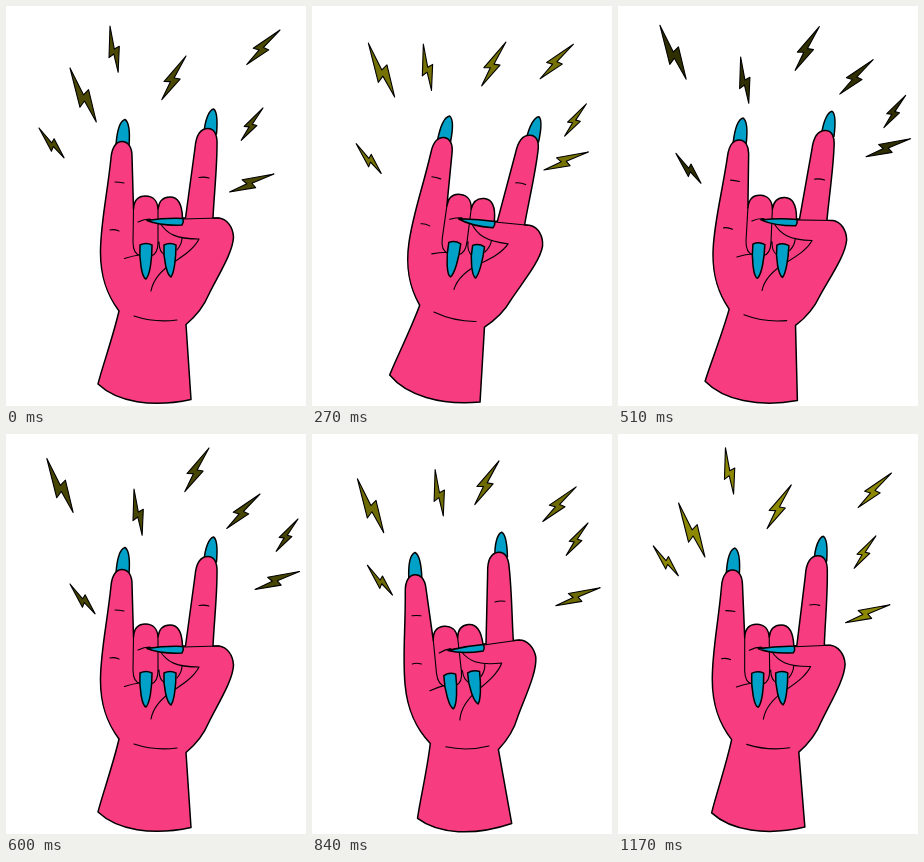
Recreate the animation shown at these times as an HTML page. Size 300 px wide and 400 px high, loop 1.2 s.

```html
<!DOCTYPE html>
<html lang="en">
<head>
<meta charset="utf-8">
<title>Rock hand</title>
<style>
  html, body { margin: 0; width: 100%; height: 100%; overflow: hidden; background: #fff; }
  svg { display: block; width: 100vw; height: 100vh; }
  .line { fill: none; stroke-width: 1.1; }
  .skin { fill: #f73c80; }
  .nail { fill: #00a1c9; }
</style>
</head>
<body>
<svg viewBox="0 0 300 400">
  <g id="bolts" stroke="#000" stroke-width="1.1" stroke-linejoin="round"></g>
  <g id="hand" stroke="#000" stroke-width="1.5" stroke-linejoin="round" stroke-linecap="round">
    <path class="nail" d="M110 139C111 125 114 115 119 113.500C123 116 124 127 123 140Z"/>
    <path class="nail" d="M198 127C199 114 203 104 207.500 103C211 105 211.500 116 210.500 128Z"/>
    <path class="skin" d="M113 305C101 289 94 271 94.500 244C95 215 101 190 105 152
      C106 140 111 135.500 116 135.500C122 135.500 126 141 126 150L127.500 203
      C128 194 133 190 139.500 190C147 190 151.500 195 152 203
      C153 195 157 191 164 191C171 191 176 196 176.500 212L179.500 212
      L189 142C190 130 194 122.500 202 122.500C208 122.500 211.500 128 211 139
      C211 163 208 190 207 212L213 212C221 213 227 221 227.500 231
      C227 246 213 268 203 288C198 300 189 311 180 318.500
      L185 393.500C146 402 111 396 92 378C95 365 107 331 113 305Z"/>
    <path class="line" d="M127.500 203L127 236C127 245 130 249 135 250
      M152 203V236C152 244 149 249 145 250M153 236C153 243 155 247 159 249
      M118.500 252.500Q126 250 133 249M132 216Q138 213 144 213
      M141 214L213 212M154 217C161 228 170 233 193 233
      C188 243 177 250 168 256C154 265 147 274 145 285
      M176 232Q176 238 171 244
      M109 176Q113 176 118 177M104 224Q108 223 113 225M193 171.500Q198 170.500 203 172
      M128 310Q149 317 171 314"/>
    <path class="nail" d="M141 214.500C151 213 163 212 177 212.500Q178 216 176 219C164 219.500 152 219 141 214.500Z"/>
    <path class="nail" d="M134 239Q140 236 146 239C146 253 144 269 140 273C136 272 133 254 134 239Z"/>
    <path class="nail" d="M158 239Q164 236 170 239C170 253 168 267 165 271C161 269 157 253 158 239Z"/>
  </g>
</svg>
<script>
const LOOP = 1200, STEP = 30;
const hand = document.getElementById("hand");
const layer = document.getElementById("bolts");

// A bolt with its tail at the origin, pointing along +x
function zigzag(len) {
  const w = 0.12 * len;
  return `M0 0L${len * 0.5} ${-w * 0.05}L${len * 0.46} ${-w}L${len} 0` +
    `L${len * 0.6} ${w * 0.2}L${len * 0.66} ${w * 1.15}Z`;
}

// Each bolt drifts from its start to a far point and back to an end point
function bolt(start, far, end, angle, len, { bow = 0.2, turn = 0.5 } = {}) {
  const el = document.createElementNS("http://www.w3.org/2000/svg", "path");
  el.setAttribute("d", zigzag(len));
  layer.append(el);
  return { el, start, far, end, angle, bow, turn };
}

const bolts = [
  bolt([104, 20], [128, 55], [105.5, 12], 80, 47),
  bolt([64, 62], [40.5, 18], [62.5, 71], 64, 60, { turn: 0.44 }),
  bolt([180, 50], [203, 14], [172.5, 53.5], 119, 50),
  bolt([274, 24], [254, 60], [274, 37.5], 134, 48),
  bolt([257, 102], [292, 85], [256.5, 103.5], 124, 39),
  bolt([268, 168], [294, 132], [270, 172], 158, 48, { bow: -0.27, turn: 0.44 }),
  bolt([33, 122], [64, 150], [33, 110.5], 50, 39)
];

// Point on a curve from a to b, bowed sideways by a share of its length
function arc([ax, ay], [bx, by], bow, s) {
  const side = 2 * s * (1 - s) * bow;
  return [
    ax + (bx - ax) * s - (by - ay) * side,
    ay + (by - ay) * s + (bx - ax) * side
  ];
}

function place({ start, far, end, bow, turn }, p) {
  return p < turn
    ? arc(start, far, bow, p / turn)
    : arc(far, end, bow, (p - turn) / (1 - turn));
}

// steady swing: 0, 1 at a quarter, -1 at three quarters
const swing = p => 1 - 4 * Math.abs((p + 0.25) % 1 - 0.5);

// flicker that grows stronger through the loop
const glow = p => 88 + (15 + 60 * p) * Math.cos(2 * Math.PI * (2.5 * p - 0.5625));

function draw(ms) {
  const p = Math.floor(ms % LOOP / STEP) * STEP / LOOP;
  hand.setAttribute("transform", `rotate(${8 * swing(p)} 156 260)`);
  const k = Math.round(glow(p));
  layer.setAttribute("fill", `rgb(${k},${Math.round(k * 0.97)},2)`);
  for (const b of bolts) {
    const [x, y] = place(b, p);
    b.el.setAttribute("transform", `translate(${x} ${y}) rotate(${b.angle})`);
  }
}

const begin = performance.now();
function tick() {
  draw(performance.now() - begin);
  requestAnimationFrame(tick);
}
tick();
</script>
</body>
</html>
```
